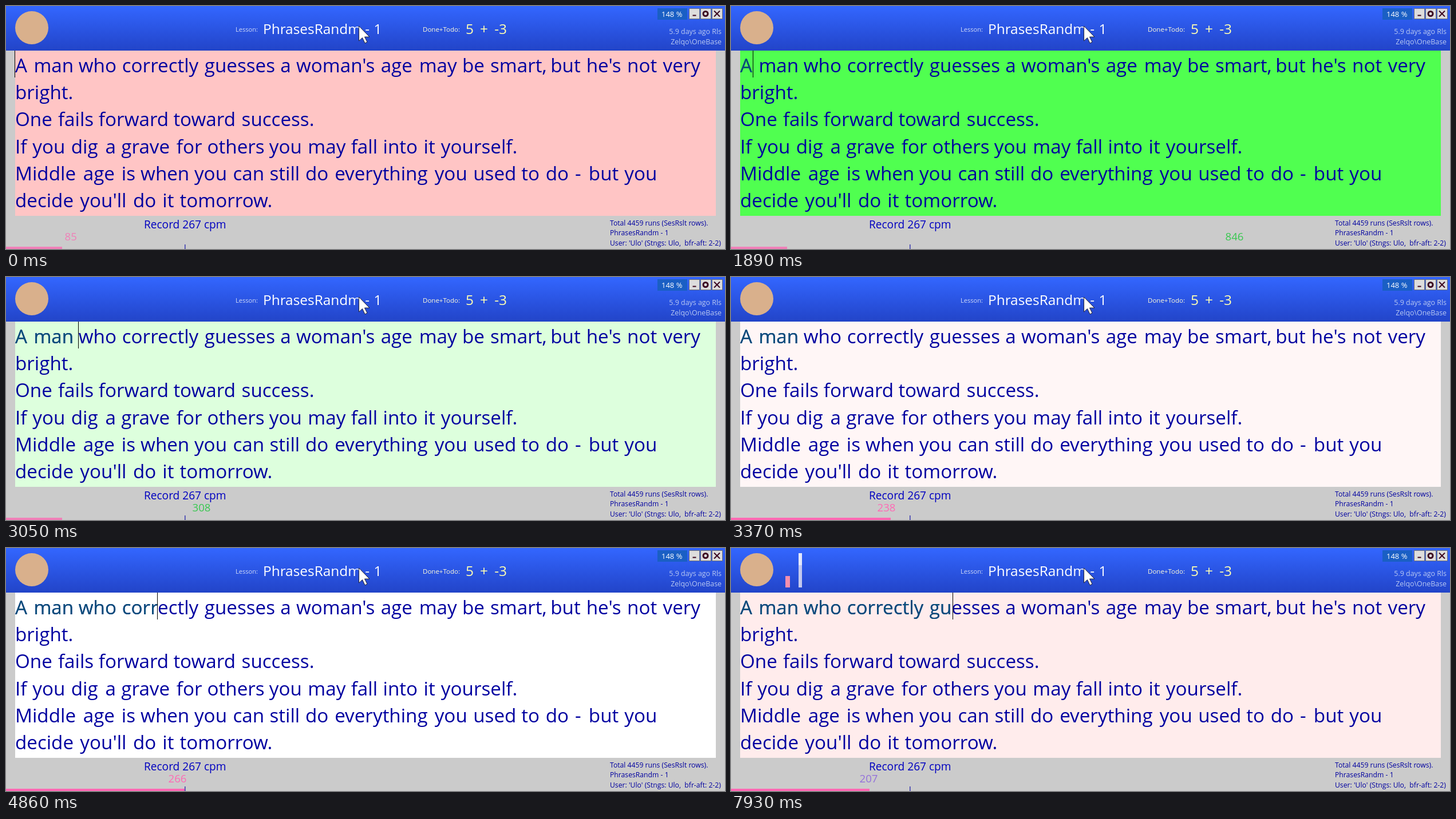
An HTML page that plays this animation: 1256 by 425 pixels, repeating every 8 s.

```html
<!DOCTYPE html>
<html lang="en">
<head>
<meta charset="utf-8">
<title>Typing lesson</title>
<style>
  html, body { margin: 0; width: 100%; height: 100%; overflow: hidden; background: #cbcbcb; }
  svg { display: block; width: 100%; height: 100%; font-family: "Open Sans", "Noto Sans", sans-serif; }
  text { white-space: pre; }
  .phrase { font-size: 33.2px; fill: #0000a0; }
  #typed { fill: #0a5078; }
  .info { font-size: 12.2px; fill: #0000a0; }
  .build { font-size: 12.4px; fill: #b9c9f2; text-anchor: end; }
</style>
</head>
<body>
<svg viewBox="0 0 1256 425">
  <defs>
    <linearGradient id="sky" x2="0" y2="1">
      <stop stop-color="#3366ff"/><stop offset="1" stop-color="#2244c8"/>
    </linearGradient>
    <clipPath id="done"><rect id="doneBox" x="15" y="78" width="0" height="48"/></clipPath>
  </defs>

  <rect width="1256" height="425" fill="#cbcbcb"/>
  <rect width="1256" height="78" fill="url(#sky)"/>
  <circle cx="45" cy="38" r="29" fill="#d9b08c"/>
  <g id="gauges">
    <rect x="95" y="49" width="8" height="20" fill="#f48fae"/>
    <rect x="118" y="9" width="6" height="60" fill="#c3c9ee"/>
    <rect x="118" y="9" width="6" height="21" fill="#e4e8fa"/>
  </g>

  <text x="401" y="45" font-size="11.1" fill="#d0daf8">Lesson:</text>
  <text x="449" y="49" font-size="24.4" fill="#fff" word-spacing="1">PhrasesRandm - 1</text>
  <text x="728" y="45" font-size="11.5" fill="#fffbd8">Done+Todo:</text>
  <text x="803" y="49" font-size="24.4" fill="#ffffb0" word-spacing="4.8">5 + -3</text>
  <path d="M616.5 35v26l6-5.500 4.500 9.500 4-2-4.500-9h8.500z" fill="#fff" stroke="#223"/>

  <rect x="1138" y="4" width="52" height="20" fill="#1a5fc4"/>
  <text x="1145" y="19" font-size="13" fill="#fff">148 %</text>
  <g fill="#ddd" stroke="#707070">
    <rect x="1193.500" y="4.500" width="18" height="18"/>
    <rect x="1213.500" y="4.500" width="18" height="18"/>
    <rect x="1233.500" y="4.500" width="18" height="18"/>
  </g>
  <g fill="none" stroke="#3c0820" stroke-width="2">
    <path d="M1199.500 16.500h6M1237 8.500l10 10M1247 8.500l-10 10"/>
    <circle cx="1222" cy="13.500" r="4" stroke-width="3"/>
  </g>
  <text class="build" x="1250" y="49">5.9 days ago Rls</text>
  <text class="build" x="1250" y="67">Zelqo\OneBase</text>

  <rect id="panel" x="16" y="78" width="1224" height="289"/>
  <g id="lines" class="phrase"></g>
  <g clip-path="url(#done)"><text id="typed" class="phrase"></text></g>
  <rect id="caret" y="78" width="1" height="47"/>

  <text x="241" y="389" font-size="19.1" fill="#0000c0">Record 267 cpm</text>
  <text id="speed" y="410" font-size="18.6"></text>
  <rect id="bar" y="421" height="4"/>
  <rect x="312" y="417" width="1.500" height="8" fill="#3838b0"/>

  <text class="info" x="1055" y="384">Total 4459 runs (SesRslt rows).</text>
  <text class="info" x="1055" y="401">PhrasesRandm - 1</text>
  <text class="info" x="1055" y="419">User: 'Ulo' (Stngs: Ulo,  bfr-aft: 2-2)</text>
</svg>

<script>
const LOOP = 8000, RECORD = 267, EM = 35.4, LEFT = 15.98;
const $ = id => document.getElementById(id);

const PHRASES = [
  "A man who correctly guesses a woman's age may be smart, but he's not very",
  "bright.",
  "One fails forward toward success.",
  "If you dig a grave for others you may fall into it yourself.",
  "Middle age is when you can still do everything you used to do - but you",
  "decide you'll do it tomorrow."
];

// Character advances in thousandths of an em, for word starts and the caret.
const ADVANCE = {
  A: 645, I: 266, M: 898, O: 754, " ": 274, "'": 229, ",": 217, ".": 217, "-": 400,
  a: 509, b: 588, c: 462, d: 588, e: 523, f: 313, g: 588, h: 565, i: 242, l: 242, m: 861,
  n: 565, o: 586, r: 348, s: 424, t: 339, u: 565, v: 479, w: 723, y: 483
};
const widthOf = str => [...str].reduce((sum, ch) => sum + ADVANCE[ch], 0) * EM / 1000;

function fillLine(text, phrase, row) {
  text.setAttribute("y", Math.round(116 + row * 47.2));
  let x = LEFT;
  for (const word of phrase.split(" ")) {
    const span = document.createElementNS(text.namespaceURI, "tspan");
    span.setAttribute("x", x);
    span.textContent = word;
    text.append(span);
    x += widthOf(word + " ");
  }
}
PHRASES.forEach((phrase, row) => {
  const text = document.createElementNS($("lines").namespaceURI, "text");
  $("lines").append(text);
  fillLine(text, phrase, row);
});
fillLine($("typed"), PHRASES[0], 0);

// [time, characters typed, speed if it is refreshed]
const EVENTS = [
  [0, 0, 85], [1890, 1, 846], [2120, 2], [2280, 3, 397], [2430, 4], [2590, 5, 434],
  [3050, 6, 308], [3370, 6, 238], [3440, 7, 265], [3600, 8, 279], [3770, 9, 280],
  [3920, 10], [4090, 10, 264], [4240, 11], [4400, 12, 280], [4690, 13, 274],
  [4860, 14, 266], [5160, 15, 264], [5470, 16, 265], [5540, 16, 260], [5780, 16, 244],
  [6170, 17, 236], [6320, 18, 241], [6550, 19, 243], [6700, 20], [6860, 20, 238],
  [7160, 20, 226], [7560, 20, 210], [7870, 21], [7930, 22, 207]
];

function panelColor(cpm) {
  if (cpm > RECORD) {
    const c = Math.round(255 * RECORD / cpm);
    return `rgb(${c},255,${c})`;
  }
  const c = Math.round(255 - (RECORD - cpm) * 0.318);
  return `rgb(255,${c},${c})`;
}

function speedColor(cpm, t) {
  if (cpm > RECORD) return cpm > 390 && cpm < 440 ? "#9ad0a6" : "#38c850";
  return t < 1890 ? "#f080b8" : t < 5160 ? "#ff69b4" : "#9370db";
}

function draw(t) {
  let chars = 0, cpm = 0, barCpm = 0;
  for (const [time, count, speed] of EVENTS) {
    if (time > t) break;
    chars = count;
    if (!speed) continue;
    cpm = speed;
    if (speed <= RECORD) barCpm = speed;
  }
  const caretX = Math.floor(LEFT + widthOf(PHRASES[0].slice(0, chars)));
  $("caret").setAttribute("x", caretX);
  $("caret").style.visibility = t >= 3370 && t < 3440 ? "hidden" : "visible";
  $("doneBox").setAttribute("width", caretX - 15);
  $("panel").setAttribute("fill", panelColor(cpm));
  $("speed").textContent = cpm;
  $("speed").setAttribute("x", cpm + 17.5);
  $("speed").setAttribute("fill", speedColor(cpm, t));
  $("bar").setAttribute("width", Math.round(barCpm * 1.18 - 2));
  $("bar").setAttribute("fill", t < 3370 ? "#f080b8" : "#ff69b4");
  $("gauges").style.visibility = t >= 7160 ? "visible" : "hidden";
}

const start = performance.now();
function tick() {
  draw((performance.now() - start) % LOOP);
  requestAnimationFrame(tick);
}
tick();
</script>
</body>
</html>
```
